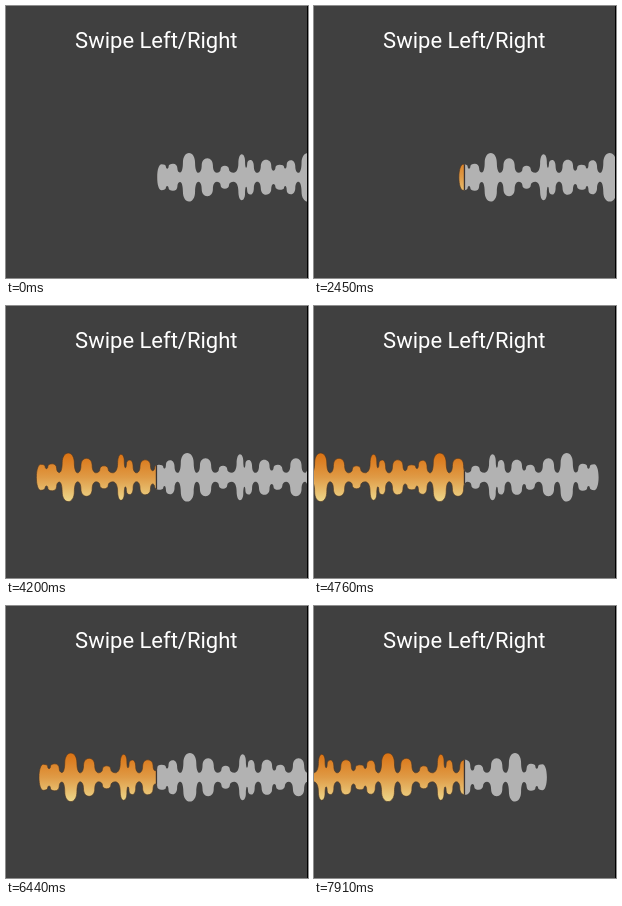
These frames come from a looping animation (302 by 272 pixels, 8000 ms). An HTML page:

```html
<!DOCTYPE html>
<html lang="en">
<head>
<meta charset="utf-8">
<title>Swipe waveform</title>
<style>
  html, body { margin: 0; width: 100%; height: 100%; overflow: hidden; background: #404040; }
  svg { display: block; }
  text { font: 22px Roboto, "Open Sans", sans-serif; fill: #fff; text-anchor: middle; }
</style>
</head>
<body>
<svg width="302" height="272" viewBox="0 0 302 272">
  <defs>
    <linearGradient id="fire" gradientUnits="userSpaceOnUse" x1="0" y1="146" x2="0" y2="196">
      <stop offset="0" stop-color="#da7010"/>
      <stop offset=".5" stop-color="#df9a45"/>
      <stop offset="1" stop-color="#eed88c"/>
    </linearGradient>
    <clipPath id="played"><rect width="150.5" height="272"/></clipPath>
    <clipPath id="rest"><rect x="150.5" width="151.5" height="272"/></clipPath>
    <clipPath id="shape"><path class="wave"/></clipPath>
  </defs>
  <rect width="302" height="272" fill="#404040"/>
  <text x="150.3" y="42">Swipe Left/Right</text>
  <g clip-path="url(#rest)"><path class="wave" fill="#b2b2b2"/></g>
  <g clip-path="url(#played)">
    <path class="wave" fill="url(#fire)" stroke="#4a3526" stroke-opacity=".7" stroke-width=".9"/>
  </g>
  <rect x="149.8" y="140" width="1.3" height="64" fill="#3c3432" clip-path="url(#shape)"/>
  <rect x="301" width="1" height="272"/>
</svg>
<script>
const LOOP = 8000, MID = 171.3, WIDTH = 310;

// Bars are { x, h }: centre and half height. One phrase plays twice between mirrored ends.
const bar = (x, h) => ({ x, h });
const phrase = at => [
  bar(at, 24.3), bar(at + 18.3, 19), bar(at + 35.8, 11.5), bar(at + 52.7, 23),
  bar(at + 61.5, 17.3), bar(at + 77, 17.5), bar(at + 90.7, 12.5)
];
const intro = [bar(4.5, 13), bar(16, 13.5), ...phrase(32), bar(134, 17)];
const outro = intro.slice(0, 4).reverse().map(b => bar(WIDTH - b.x, b.h));
const bars = [...intro, ...phrase(151), ...outro];

// Taller bars are wider, crowded ones narrower
bars.forEach((b, i) => {
  const gaps = [bars[i - 1], bars[i + 1]].filter(Boolean).map(n => Math.abs(n.x - b.x));
  b.w = Math.min(2 + b.h * 0.19, Math.min(...gaps) * 0.38);
});

// Tight valleys stay shallow
function valley(a, b) {
  const left = a.x + a.w, right = b.x - b.w;
  return { x: (left + right) / 2, h: Math.max(4.5, 12.5 - 1.4 * (right - left)) };
}

// Rounded corner leaving or arriving horizontally, vertical at the other end
function corner(x0, y0, x1, y1, flatFirst) {
  const k = 0.58, dx = (x1 - x0) * k, dy = (y1 - y0) * k;
  return flatFirst
    ? `C${x0 + dx},${y0} ${x1},${y1 - dy} ${x1},${y1}`
    : `C${x0},${y0 + dy} ${x1 - dx},${y1} ${x1},${y1}`;
}

// One edge, left to right (dir 1, top) or back again (dir -1, bottom)
function edge(list, dir) {
  const y = h => MID - dir * h;
  const first = list[0];
  let d = corner(first.x - dir * first.w, MID, first.x, y(first.h), false);
  list.forEach((b, i) => {
    const side = b.x + dir * b.w, next = list[i + 1];
    if (!next) {
      d += corner(b.x, y(b.h), side, MID, true);
      return;
    }
    const v = dir > 0 ? valley(b, next) : valley(next, b);
    const fall = y((b.h + v.h) / 2), rise = y((next.h + v.h) / 2);
    const nextSide = next.x - dir * next.w;
    d += corner(b.x, y(b.h), side, fall, true) + corner(side, fall, v.x, y(v.h), false) +
      corner(v.x, y(v.h), nextSide, rise, true) + corner(nextSide, rise, next.x, y(next.h), false);
  });
  return d;
}

const easeOut = u => 1 - (1 - u) ** 1.3;
const easeInOut = u => u * u * (3 - 2 * u);

// Each swipe moves the left end of the wave to a new place
const REST = 151;
const swipes = [
  { from: 2390, until: 3080, to: 96, ease: easeOut },
  { from: 3640, until: 5250, to: -58, ease: easeOut },
  { from: 5460, until: 6330, to: 34, ease: easeOut },
  { from: 6380, until: 7390, to: -77, ease: easeInOut }
];

function position(t) {
  return swipes.reduce((x, s) => {
    const u = Math.min(1, Math.max(0, (t - s.from) / (s.until - s.from)));
    return x + (s.to - x) * s.ease(u);
  }, REST);
}

const waves = document.querySelectorAll(".wave");
const outline = `M${bars[0].x - bars[0].w},${MID}` + edge(bars, 1) + edge([...bars].reverse(), -1) + "Z";
waves.forEach(w => w.setAttribute("d", outline));

function draw(t) {
  const shift = `translate(${position(t).toFixed(2)} 0)`;
  waves.forEach(w => w.setAttribute("transform", shift));
}

const start = performance.now();
function tick() {
  draw((performance.now() - start) % LOOP);
  requestAnimationFrame(tick);
}
tick();
</script>
</body>
</html>
```
